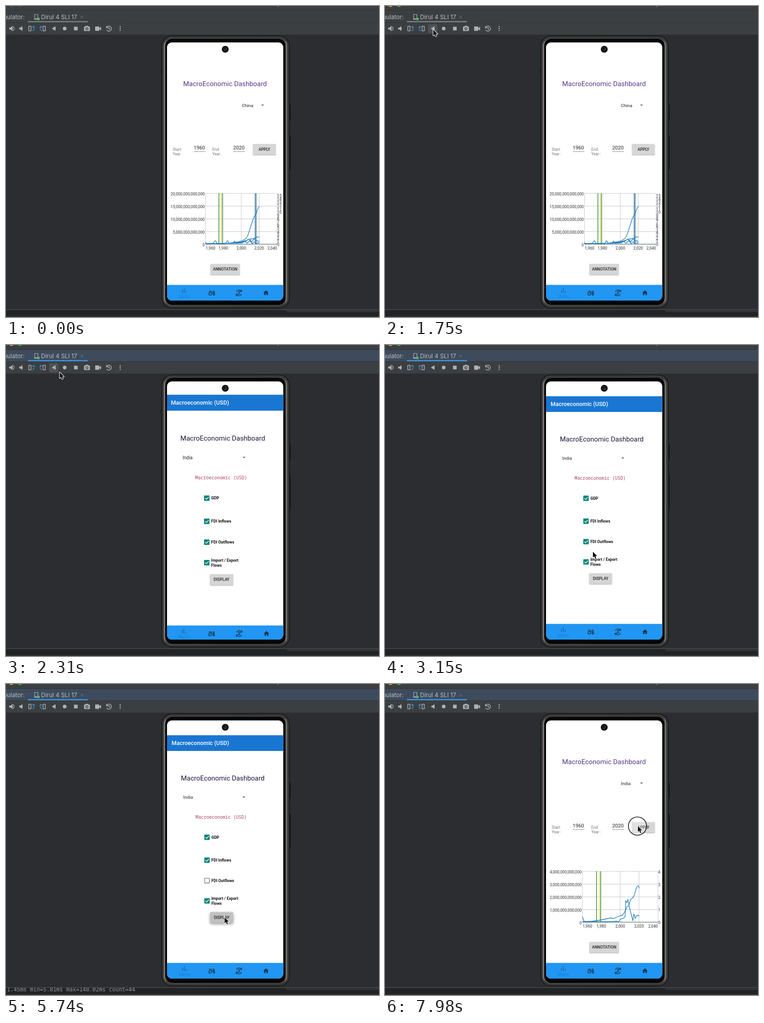
An HTML page with a canvas that plays this animation: 820x683 px, repeating every 8 s.

```html
<!DOCTYPE html>
<html lang="en">
<head>
<meta charset="utf-8">
<title>Phone emulator dashboard</title>
<style>
  html, body { margin: 0; width: 100%; height: 100%; overflow: hidden; background: #2c2d31; }
  canvas { display: block; }
</style>
</head>
<body>
<canvas id="stage" width="820" height="683"></canvas>
<script>
const LOOP = 8000, STEP = 70;
const c = document.getElementById('stage').getContext('2d');
const ROBOTO = 'Roboto, sans-serif', UI = 'Inter, sans-serif';
const MONO = '"Noto Sans Mono", monospace', LOG = '"DejaVu Sans Mono", monospace';

const clamp = v => Math.max(0, Math.min(1, v));
const fill = (d, color) => { c.fillStyle = color; c.fill(new Path2D(d)); };
const line = (d, color, width = 1) => {
  c.strokeStyle = color; c.lineWidth = width; c.lineJoin = 'round';
  c.stroke(new Path2D(d));
};
const rect = (x, y, w, h, color, r = 0) => {
  c.fillStyle = color; c.beginPath(); c.roundRect(x, y, w, h, r); c.fill();
};
const disc = (x, y, r, color) => {
  c.fillStyle = color; c.beginPath(); c.arc(x, y, r, 0, 7); c.fill();
};
// y is the middle of the capitals
function text(s, x, y, size, color, { weight = 400, align = 'left', font = ROBOTO } = {}) {
  c.font = `${weight} ${size}px ${font}`;
  c.textAlign = align; c.fillStyle = color;
  c.fillText(s, x, y + size * .355);
}

function windowChrome(t) {
  const focused = t >= 1820;
  rect(0, 0, 820, 683, '#2c2d31');
  rect(0, 0, 820, 63, '#3c3f41');
  disc(12, -3.5, 5.5, t >= 1750 ? '#f5a623' : '#57595b');
  disc(31, -3.5, 5.5, t >= 1750 ? '#28c840' : '#57595b');
  line('M596 1.5q2 0 3-1.5', '#a0a2a4');
  rect(0, 10, 820, 26, focused ? '#3d4b5c' : '#3c3f41');
  rect(0, 9.5, 820, 1, '#323335');
  rect(0, 36, 820, 1, '#323335');
  rect(0, 62.5, 820, 1, '#303234');
  text('Emulator:', 41, 24, 13, '#bbbdbf', { font: UI, align: 'right' });
  line('M63 18.5h7v11h-7z', '#aeb1b4', 1.2);
  line('M62 28h8', '#aeb1b4', 1.5);
  rect(69, 26, 5, 5, '#4fb866');
  text('Dirul 4 SLI 17', 77, 24, 13, '#bbbdbf', { font: UI });
  line('M164 21.5l5.5 5.5m0-5.5l-5.5 5.5', '#77797b');
  rect(48, 33, 132, 3, focused ? '#3b8fd6' : '#747a80');
  toolbar(t >= 1750 && t < 2380);
}

function toolbar(hover) {
  const gray = '#afb1b3', blue = '#3592d8';
  if (hover) rect(95, 40, 20, 20, '#4e5254', 3);
  for (const [x, waves] of [[7, 2], [29, 1]]) {
    fill(`M${x} 47.5h3l4-3.5v11l-4-3.5h-3z`, gray);
    line(`M${x + 6} 47q2.5 2.5 0 5`, gray, 1.2);
    if (waves > 1) line(`M${x + 7.5} 44.5q7 5 0 10`, gray, 1.3);
  }
  line('M50 44.5h5v10h-5z', gray, 1.4);
  line('M58 55q7-5 2-10m-2.5 2.5l2.5-3 3 2', blue, 1.5);
  line('M81.500 44.5h5v10h-5z', gray, 1.4);
  line('M79 55q-7-5-2-10m2.500 2.500l-2.500-3-3 2', blue, 1.5);
  fill('M100.500 49.500l8.500-5v10z', gray);
  disc(129, 49.5, 4, gray);
  rect(149.5, 45.5, 8, 8, gray);
  rect(171.5, 45, 13, 10, gray, 1.5);
  rect(175, 43.5, 6, 3, gray);
  disc(178, 50, 3.2, '#3c3f41');
  disc(178, 50, 1.8, gray);
  rect(196, 45, 9, 9.5, gray, 1);
  fill('M205 49l4-3.500v8.500l-4-3.500z', gray);
  line('M221.500 47a5.500 5.500 0 1 1 0 5.500M221 44v4h4M226.500 46.500v3.500l2.500 1.500', gray, 1.5);
  for (const y of [45.5, 49.5, 53.5]) disc(251, y, 1.3, gray);
}

function logPanel(t) {
  rect(0, 666, 820, 17, '#222325');
  rect(0, 666, 820, 1.2, '#505254');
  rect(616, 668, 210, 4, '#323437', [0, 0, 0, 4]);
  rect(0, 681, 820, 2, '#303234');
  if (t < 5740 || t >= 5950) return;
  c.save();
  c.beginPath(); c.rect(0, 667, 820, 16); c.clip();
  text('1.45ms min=5.81ms max=148.02ms count=44', 284, 670.5, 12, '#94979a', { font: LOG, align: 'right' });
  c.restore();
}

function phoneBody() {
  rect(623, 217, 3, 35, '#151617', 1);
  rect(623, 286, 3, 73, '#151617', 1);
  rect(340.5, 140, 2, 8, '#151617');
  rect(341.5, 65, 282.5, 599, '#161718', 23);
  rect(343.5, 67, 278.5, 595, '#454644', 21);
  rect(345, 69, 275.5, 591.5, '#20211f', 20);
  const rim = c.createLinearGradient(345, 0, 620, 0);
  [[0, '#3e3f3c'], [.012, '#7d7c77'], [.03, '#4a4a47'], [.97, '#41423f'], [.988, '#747470'], [1, '#383936']]
    .forEach(([at, color]) => rim.addColorStop(at, color));
  rect(346, 70, 273.5, 589.5, rim, 19);
  rect(350, 72, 264.5, 584.5, '#060606', 16);
}

const polyline = (points, color = '#1878be', w = 1.3) => line('M' + points, color, w);

const charts = {
  China: {
    left: 438.5, right: 596, axis: 596, unit: 5, zeros: ',000,000,000,000', ticks: 15, tickTop: 417, marks: [468, 475],
    curves: [
      '438 522 490 521 510 518 520 515 527 511 531 505 535 494 539 481 543 469 546 462 550 457 553 446 557 440',
      '500 521 517 518 528 515 535 512 545 511 550 508 554 507 557 508',
      '505 521 517 519 528 516 533 512 537 514 540 518 547 510 549 515 557 517',
      '438 519 441 522 456 521 459 516 461 516 464 522 483 522 486 516 488 516 490 521 500 521 502 516 505 521 520 520 525 517 530 521 536 515 541 522 545 518 550 521 557 520'
    ]
  },
  India: {
    left: 434, right: 600, axis: 600.5, unit: 1, zeros: ',000,000,000,000', ticks: 4, tickTop: 413, marks: [465, 473.2],
    curves: [
      '434 522 455 521 470 519 485 516 496 514 503 515 509 512 517 509 522 508 527 500 530 495 532 489 536 487 540 473 544 470 547 466 550 457 553 446 557 443 559 449',
      '434 511 437 520 440 522 500 522 508 521 514 522 518 516 525 514 528 510 529 476 532 480 534 473 537 489 540 501 545 520 547 505 550 515 553 509 557 508 559 510'
    ]
  }
};

function graph(country) {
  const g = charts[country], ink = '#333', size = 8.7;
  for (let i = 0; i < 5; i++) {
    const y = 411.5 + i * 28, x = g.left + (g.right - g.left) * i / 4;
    line(`M${g.left} ${y}H${g.right}M${x} 411.5V523`, '#c9c9c9');
    text(i < 4 ? (4 - i) * g.unit + g.zeros : '0', g.left - 1.5, y + 1.2 - i * .05, size, ink, { align: 'right' });
    const align = ['left', 'center', 'center', 'center', 'right'][i];
    text('1,960 1,980 2,000 2,020 2,040'.split(' ')[i], x + (i ? 0 : .5), 532, size, ink, { align });
  }
  for (let i = 0; i <= g.ticks; i++)
    text(g.ticks - i, g.axis, g.tickTop + (524 - g.tickTop) * i / g.ticks, size, ink);
  const [a, b] = g.marks;
  line(`M${g.left} 523H${g.right}`, '#4f6b62', 1.2);
  line(`M${a} 411V523`, '#3c8a3a', 1.5);
  line(`M${b - 1} 411V523`, '#f3ea3c', 1.6);
  line(`M${b + .7} 411V523`, '#3c8a4a', 1.5);
  line(`M${b + 2} 411V523`, '#cfe6f3', 1);
  if (country === 'China') {
    rect(547, 411, 3.5, 112, '#a7bccb');
    line('M547.5 411V523M550 411V523', '#3f7fae', 1.2);
  }
  g.curves.forEach(points => polyline(points));
}

function button(label, x, y, w, h, press = 0) {
  const gray = Math.round(214 - 22 * press);
  c.save();
  c.shadowColor = `rgba(0,0,0,${.35 + .1 * press})`;
  c.shadowBlur = 2 + 4 * press; c.shadowOffsetY = 1 + press;
  rect(x, y, w, h, `rgb(${gray},${gray},${gray})`, 1);
  c.restore();
  text(label, x + w / 2, y + h / 2, 8.7, '#222', { weight: 500, align: 'center' });
}

const dropArrow = (x, y) => fill(`M${x - 3.2} ${y - 1.6}h6.400l-3.200 3.300z`, '#6b6b6b');

function navBar() {
  const dim = '#1b74bf', ink = '#17364f';
  rect(354, 612.5, 256, 60, '#2196f3');
  rect(387, 623, 2.2, 7, dim); rect(391, 619.5, 2.2, 10.5, dim); rect(395, 626, 2.2, 4, dim);
  text('Macro', 392, 637.5, 8.7, '#1b7fd3', { align: 'center' });
  c.strokeStyle = ink; c.lineWidth = 1.5;
  for (const [x, y, r] of [[449, 632, 3], [457, 633, 1.8]]) {
    c.beginPath(); c.arc(x, y, r, 0, 7); c.stroke();
  }
  line('M446 626.500h6l2 3.500h4v-3h-3M456 627v-2', ink, 1.5);
  line('M506.500 627.500a6 6 0 0 1 10.500-1.500M517.500 632.500a6 6 0 0 1-10.500 1.500M518 623v4h-4M506 637v-4h4', ink, 1.4);
  text('$', 512, 630, 9, ink, { weight: 700, align: 'center' });
  fill('M565.500 630l6-5.500 6 5.500h-1.800v5h-3v-3.500h-2.400v3.500h-3v-5z', ink);
}

function chartScreen(country) {
  rect(340, 60, 290, 610, '#fff');
  text('MacroEconomic Dashboard', 481.5, 171, 14.92, '#573a8c', { align: 'center' });
  text(country, 518.5, 218, 9.95, '#222');
  dropArrow(564, 218);
  for (const [name, x, year] of [['Start', 366.5, 1960], ['End', 453.5, 2020]]) {
    text(name, x, 315, 8.7, '#777');
    text('Year :', x, 325, 8.7, '#777');
    text(year, x + 46, 311, 11.2, '#222');
    rect(x + 46, 319.3, 26, 1, '#8a8a8a');
  }
  button('APPLY', 543, 303, 50, 23.5);
  graph(country);
  button('ANNOTATION', 449.5, 566.5, 64.5, 23.5);
  navBar();
}

function checkBox(label, y, checked) {
  if (checked) {
    rect(436, y - 5.8, 11.8, 11.8, '#0b8378', 1);
    line(`M438.500 ${y}l2.500 2.700 5-5.200`, '#fff', 1.4);
  } else line(`M436.700 ${y - 5.2}h10.400v10.400h-10.400z`, '#777', 1.3);
  label.forEach((s, i) =>
    text(s, 451.5, y + (label.length > 1 ? i * 10.3 - 4.8 : 0), 8.7, '#111', { weight: 700 }));
}

function menuScreen(t) {
  rect(340, 60, 290, 610, '#fff');
  rect(340, 112.5, 290, 34.5, '#1976d2');
  text('Macroeconomic (USD)', 364, 130, 12.5, '#fff', { weight: 500 });
  text('MacroEconomic Dashboard', 476.5, 206.3, 14.92, '#22163a', { align: 'center' });
  text('India', 389.5, 248.5, 9.95, '#222');
  dropArrow(522.8, 248.5);
  text('Macroeconomic (USD)', 473, 292.5, 9.9, '#ab4066', { font: MONO, align: 'center' });
  checkBox(['GDP'], 336.5, true);
  checkBox(['FDI Inflows'], 386.7, true);
  checkBox(['FDI Outflows'], 431.8, t < 3850);
  checkBox(['Import / Export', 'Flows'], 476.2, true);
  button('DISPLAY', 449, 501.3, 50, 23.5, clamp((t - 5180) / 280));
  navBar();
}

function scaled(s, alpha, draw) {
  c.save();
  c.globalAlpha = alpha;
  c.translate(481.5, 352); c.scale(s, s); c.translate(-481.5, -352);
  draw();
  c.restore();
}

function phoneScreen(t) {
  c.save();
  c.beginPath(); c.roundRect(354, 80, 255.5, 567, 11); c.clip();
  if (t < 2170) chartScreen('China');
  else if (t < 5950) {
    const back = t - 2100;
    scaled(back < 600 ? 1 + .1 * Math.exp(-back / 105) : 1, 1, () => menuScreen(t));
    if (back < 140) scaled(.95, .4, () => chartScreen('China'));
  } else {
    const open = t - 5880;
    if (open < 300) menuScreen(t);
    scaled(open < 300 ? 1 - .15 * Math.exp(-open / 50) : 1, clamp(open / 140), () => chartScreen('India'));
  }
  c.restore();
  disc(482, 95, 7.6, '#101112');
  disc(482, 95, 4, '#2a2b2d');
  disc(481, 94, 1.6, '#090909');
}

// moves: start, end, x, y
const moves = [
  [280, 980, 123, 87], [1120, 1260, 103, 42], [1260, 1330, 106, 52],
  [2170, 2310, 118, 60], [2310, 2660, 437, 518], [2870, 3150, 457, 454],
  [3220, 3500, 442, 426], [3850, 4620, 482.5, 535], [4620, 5040, 480.5, 512.5],
  [6860, 7700, 553, 317], [7700, 7910, 556, 312]
];
const clicks = [1610, 3640, 5110, 7980];

function pointer(t) {
  let x = 396, y = 690;
  for (const [start, end, toX, toY] of moves) {
    const p = clamp((t - start) / (end - start)), e = p * p * (3 - 2 * p);
    x += (toX - x) * e; y += (toY - y) * e;
  }
  if (clicks.some(at => t >= at && t < at + 140)) {
    c.beginPath(); c.arc(x - 1, y, 20, 0, 7);
    c.fillStyle = 'rgba(255,255,255,.25)'; c.fill();
    c.strokeStyle = '#161616'; c.lineWidth = 1.6; c.stroke();
  }
  c.save();
  c.translate(x, y);
  const arrow = 'M0 0V13l3-2.800 2.200 5 2.300-1-2.200-4.800h4.200z';
  line(arrow, '#fff', 2);
  fill(arrow, '#111');
  c.restore();
}

function render(now) {
  const time = now % LOOP, t = Math.floor(time / STEP) * STEP;
  windowChrome(t);
  logPanel(t);
  phoneBody();
  phoneScreen(t);
  pointer(t);
  requestAnimationFrame(render);
}
requestAnimationFrame(render);
</script>
</body>
</html>
```
